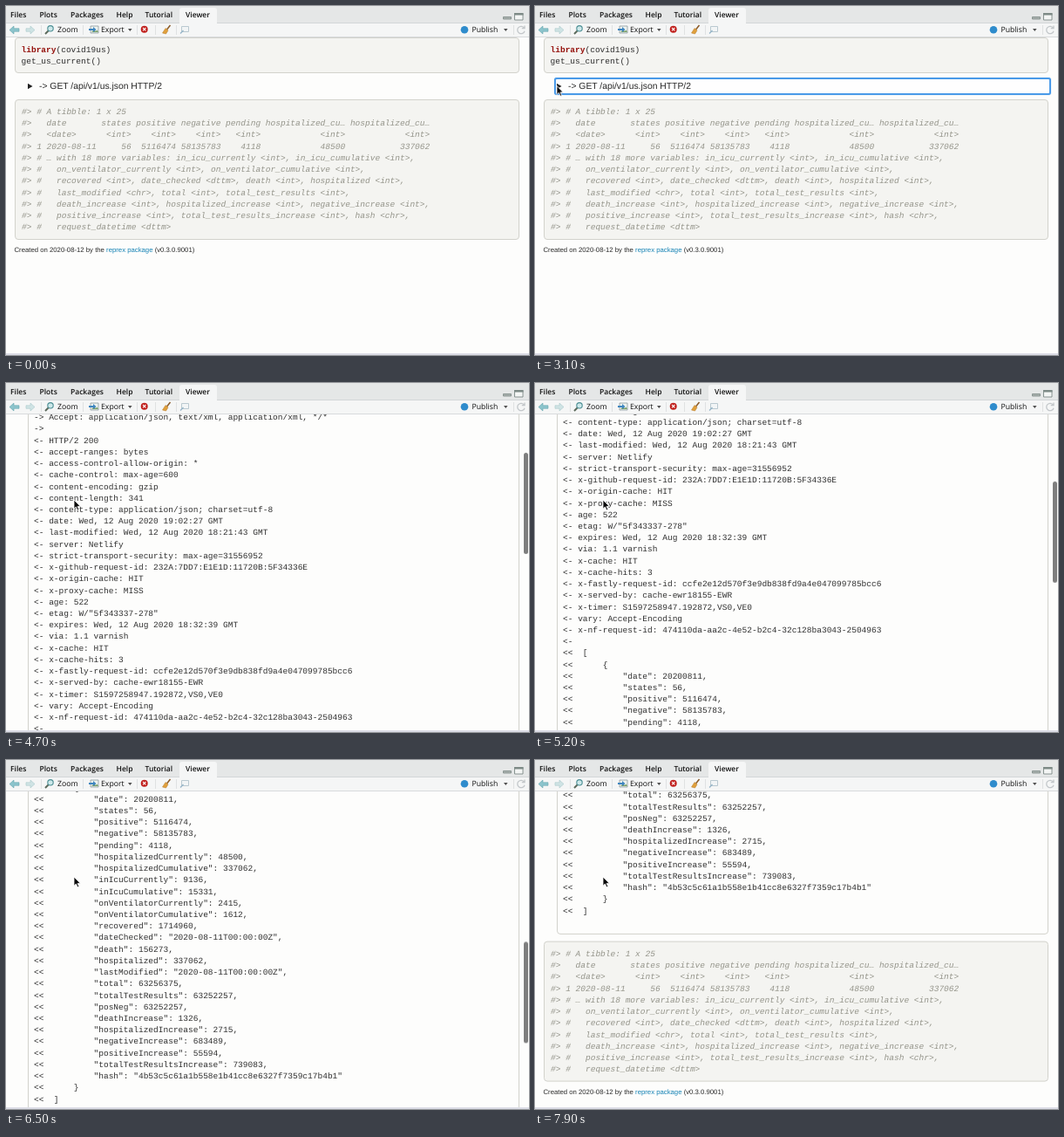
These frames come from a looping animation (600 by 400 pixels, 8000 ms). An HTML page:

```html
<!DOCTYPE html>
<html lang="en">
<head>
<meta charset="utf-8">
<title>Viewer pane</title>
<style>
@property --scroll { syntax: "<number>"; inherits: true; initial-value: 0; }
@property --shift { syntax: "<number>"; inherits: true; initial-value: 0; }

html, body { margin: 0; width: 100%; height: 100%; overflow: hidden; }
body { text-rendering: geometricPrecision; }
#stage {
  position: relative; width: 600px; height: 400px; overflow: hidden;
  background: #fdfdfc;
  animation: scroll 8s infinite, open 8s step-end infinite;
}
#stage * { position: absolute; box-sizing: border-box; }
#stage a, #stage b { position: static; }

/* window frame */
.tabs { inset: 0 0 auto; height: 20px; background: #e5e7e7; border-bottom: 1px solid #d3d6d8; }
.tab { left: 199px; top: 2px; width: 43px; height: 18px; background: #f5f6f6; border-radius: 3px 3px 0 0; }
.tools { top: 20px; width: 600px; height: 16px; background: #f5f6f6; border-bottom: 1px solid #d8dadc; }
.foot { top: 398px; width: 600px; height: 2px; background: #dcdde6; }
.chrome { left: 0; top: 0; font: 600 8.5px "Open Sans", sans-serif; fill: #101010; }
.chrome .tool { font-weight: 500; font-size: 8.7px; }

/* page */
.view { top: 36px; width: 600px; height: 362px; overflow: hidden; }
.page { top: -36px; width: 600px; height: 1200px; transform: translateY(calc(var(--scroll) * -1px)); }
.rest { top: 0; width: 600px; transform: translateY(calc(var(--shift) * 1px)); }
.box { left: 9.5px; width: 579.5px; border: 1px solid #d2d2cc; border-radius: 4px; background: #f4f4f1; }
pre { margin: 0; font: 9.52px/13.22px "Liberation Mono", monospace; color: #303030; white-space: pre; }
pre b { color: #96140f; }
.output { left: 18px; top: 115px; color: #94948a; font-style: italic; }
.note { left: 9.5px; top: 274px; font: 7.76px/12px "Liberation Sans", sans-serif; color: #2a2a2a; white-space: nowrap; }
.note a { color: #1482b4; }
.summary { left: 38px; top: 86px; font: 10.35px/14px "Liberation Sans", sans-serif; color: #262626; white-space: nowrap; }
.ring {
  left: 22px; top: 82px; width: 569.5px; height: 20px;
  border: 2.5px solid #4a9ae8; border-radius: 3px; background: #fefefe;
  box-shadow: 0 0 1px #7cb8f0; animation: ring 8s step-end infinite;
}
.arrow { left: 24.5px; top: 88.5px; width: 6px; height: 7px; background: #222; animation: turn 8s step-end infinite; }
.details { top: 0; width: 600px; animation: reveal 8s step-end infinite; }
.details .box { left: 24.5px; top: 103px; width: 564.5px; height: 834.5px; background: #fdfdfc; }
.thumb {
  left: 593.5px; top: 37.3px; width: 5px; height: 116px; border-radius: 2.5px; background: #7e7e7e;
  transform: translateY(calc(var(--scroll) * .3286px)); animation: thumb 8s infinite;
}
.cursor { left: 0; top: 0; overflow: visible; animation: cursor 8s infinite; }

@keyframes scroll {
  0%, 47.5% { --scroll: 0; animation-timing-function: steps(5); }
  53.75% { --scroll: 63; animation-timing-function: steps(4); }
  58.75% { --scroll: 130.7; animation-timing-function: steps(10); }
  71.25% { --scroll: 331; animation-timing-function: steps(8); }
  81.25% { --scroll: 521.6; animation-timing-function: steps(7); }
  90%, 100% { --scroll: 738.1; }
}
@keyframes open { 0% { --shift: 0; } 40%, 100% { --shift: 838.7; } }
@keyframes reveal { 0% { visibility: hidden; } 40%, 100% { visibility: visible; } }
@keyframes ring { 0% { visibility: hidden; } 37.5%, 100% { visibility: visible; } }
@keyframes turn {
  0% { clip-path: polygon(0 0, 100% 50%, 0 100%); }
  40%, 100% { clip-path: polygon(0 10%, 100% 10%, 50% 95%); }
}
@keyframes thumb {
  0%, 47.4% { opacity: 0; }
  48.75%, 92% { opacity: 1; }
  95%, 100% { opacity: 0; }
}
@keyframes cursor {
  0%, 28.74% { transform: translate(60px, 180px); visibility: hidden; }
  28.75% { transform: translate(60px, 180px); visibility: visible; animation-timing-function: steps(5); }
  35%, 42.5% { transform: translate(25px, 91.5px); visibility: visible; animation-timing-function: steps(4); }
  47.5%, 100% { transform: translate(78px, 134px); visibility: visible; }
}
</style>
</head>
<body>
<div id="stage">
  <div class="view">
    <div class="page">
      <div class="box" style="top:35.5px;height:41.5px"></div>
      <pre style="left:17.5px;top:44.2px"><b>library</b>(covid19us)
get_us_current()</pre>
      <div class="ring"></div>
      <div class="arrow"></div>
      <div class="summary">-&gt; GET /api/v1/us.json HTTP/2</div>
      <div class="details">
        <div class="box"></div>
        <pre id="log" style="left:32px;top:111.4px"></pre>
      </div>
      <div class="rest">
        <div class="box" style="top:107px;height:160.5px"></div>
        <pre class="output" id="output"></pre>
        <div class="note">Created on 2020-08-12 by the <a>reprex package</a> (v0.3.0.9001)</div>
      </div>
    </div>
  </div>
  <div class="thumb"></div>

  <div class="tabs"></div>
  <div class="tab"></div>
  <div class="tools"></div>
  <div class="foot"></div>
  <svg class="chrome" width="600" height="40">
    <g>
      <text x="5" y="13.4">Files</text>
      <text x="38.5" y="13.4">Plots</text>
      <text x="74" y="13.4">Packages</text>
      <text x="126.5" y="13.4">Help</text>
      <text x="159.5" y="13.4">Tutorial</text>
      <text x="206" y="13.4">Viewer</text>
    </g>
    <g class="tool">
      <text x="59" y="30.4">Zoom</text>
      <text x="109" y="30.4">Export</text>
      <text x="534.5" y="30.4">Publish</text>
    </g>
    <path d="M140 26h4.6l-2.3 3zM571 26h4.6l-2.3 3z" fill="#505050"/>
    <path d="M40.5 22v11M88.5 22v11M150.5 22v11M171.5 22v11M195.5 22v11M582.5 22v11" stroke="#dfe1e2"/>
    <!-- history arrows -->
    <path d="M4 27.5l5-4.500v2.800h6v3.400h-6v2.800z" fill="#8cc4cc" stroke="#64a5ae" stroke-width=".6"/>
    <path d="M33 27.5l-5-4.500v2.800h-5v3.400h5v2.800z" fill="#cfe3e4" stroke="#a9c9cc" stroke-width=".6"/>
    <!-- magnifier -->
    <path d="M45 32l4-4" stroke="#5b6a5c" stroke-width="2"/>
    <circle cx="51" cy="25.8" r="3.2" fill="#cde8ea" stroke="#4d8f94" stroke-width="1.1"/>
    <!-- export -->
    <path d="M97 23h9v8h-9z" fill="#eef3f0" stroke="#8b9aa0" stroke-width=".8"/>
    <path d="M98 30l3-3 2 2 1.5-1.5 1.5 2.5z" fill="#7ba06a"/>
    <path d="M95 26h5v-2l3.5 3-3.5 3v-2h-5z" fill="#3f86c0"/>
    <!-- remove -->
    <circle cx="158.7" cy="26.7" r="4" fill="#c01f1c"/>
    <path d="M157 25l3.4 3.4m0-3.4l-3.4 3.4" stroke="#fff" stroke-width="1.1"/>
    <!-- broom -->
    <path d="M188.5 22l-4 5" stroke="#8a5a28" stroke-width="1.5"/>
    <path d="M183 25.5l3 2.5-2.5 4-4-1z" fill="#e0a03c" stroke="#b67a28" stroke-width=".5"/>
    <!-- new window -->
    <path d="M201.5 23.5h8v6h-8z" fill="#f2f5f6" stroke="#b4c4cc" stroke-width=".9"/>
    <path d="M200 31.5l3.5-3.5" stroke="#94b4c8" stroke-width="1.3"/>
    <circle cx="526" cy="27.3" r="4.3" fill="#2f8ccc"/>
    <!-- refresh -->
    <path d="M594.5 25.2a4.2 4.2 0 1 0 .5 3.5M595 22.5v3.2h-3.2" fill="none" stroke="#c3c7ca" stroke-width="1.3"/>
    <!-- pane buttons -->
    <path d="M570.5 12.5h9v2.5h-9z" fill="#a9b1ae" stroke="#7d8a86" stroke-width=".8"/>
    <path d="M583.5 8.5h9.5v7.5h-9.5z" fill="#f4f6f5" stroke="#7d8a86" stroke-width=".9"/>
    <path d="M583 8h10.5v2.5h-10.5z" fill="#7d8a86"/>
  </svg>
  <svg class="cursor" width="10" height="14">
    <path d="M0 0v10.2l2.4-2.2 1.7 3.7 1.7-.8-1.7-3.5h3.2z" fill="#0a0a0a" stroke="#fff" stroke-width=".8"/>
  </svg>
</div>
<script>
const prefix = (mark, text) => text.trim().split("\n").map(line => mark + line.trim());
const show = (id, lines) => document.getElementById(id).textContent = lines.join("\n");

const request = prefix("-> ", `GET /api/v1/us.json HTTP/2
  Host: covidtracking.com
  User-Agent: libcurl/7.64.1 r-curl/4.3 httr/1.4.2
  Accept-Encoding: deflate, gzip
  Accept: application/json, text/xml, application/xml, */*`);

const response = prefix("<- ", `HTTP/2 200
  accept-ranges: bytes
  access-control-allow-origin: *
  cache-control: max-age=600
  content-encoding: gzip
  content-length: 341
  content-type: application/json; charset=utf-8
  date: Wed, 12 Aug 2020 19:02:27 GMT
  last-modified: Wed, 12 Aug 2020 18:21:43 GMT
  server: Netlify
  strict-transport-security: max-age=31556952
  x-github-request-id: 232A:7DD7:E1E1D:11720B:5F34336E
  x-origin-cache: HIT
  x-proxy-cache: MISS
  age: 522
  etag: W/"5f343337-278"
  expires: Wed, 12 Aug 2020 18:32:39 GMT
  via: 1.1 varnish
  x-cache: HIT
  x-cache-hits: 3
  x-fastly-request-id: ccfe2e12d570f3e9db838fd9a4e047099785bcc6
  x-served-by: cache-ewr18155-EWR
  x-timer: S1597258947.192872,VS0,VE0
  vary: Accept-Encoding
  x-nf-request-id: 474110da-aa2c-4e52-b2c4-32c128ba3043-2504963`);

const record = {
  date: 20200811, states: 56, positive: 5116474, negative: 58135783, pending: 4118,
  hospitalizedCurrently: 48500, hospitalizedCumulative: 337062,
  inIcuCurrently: 9136, inIcuCumulative: 15331,
  onVentilatorCurrently: 2415, onVentilatorCumulative: 1612,
  recovered: 1714960, dateChecked: "2020-08-11T00:00:00Z", death: 156273,
  hospitalized: 337062, lastModified: "2020-08-11T00:00:00Z", total: 63256375,
  totalTestResults: 63252257, posNeg: 63252257, deathIncrease: 1326,
  hospitalizedIncrease: 2715, negativeIncrease: 683489, positiveIncrease: 55594,
  totalTestResultsIncrease: 739083, hash: "4b53c5c61a1b558e1b41cc8e6327f7359c17b4b1"
};
const fields = Object.entries(record).map(([key, value]) => `"${key}": ${JSON.stringify(value)}`);
const body = ["  [", "      {", ...fields.join(",\n").split("\n").map(f => " ".repeat(10) + f), "      }", "  ]"];
show("log", [...request, "->", ...response, "<-", ...body.map(line => "<<" + line)]);

const widths = [7, 9, 9, 8, 17, 17];
const row = (head, cells) => head.padEnd(15) + cells.map((c, i) => c.padStart(widths[i])).join("");
const cut = "hospitalized_cu…";
const variables = prefix("#> #   ", `on_ventilator_currently <int>, on_ventilator_cumulative <int>,
  recovered <int>, date_checked <dttm>, death <int>, hospitalized <int>,
  last_modified <chr>, total <int>, total_test_results <int>,
  death_increase <int>, hospitalized_increase <int>, negative_increase <int>,
  positive_increase <int>, total_test_results_increase <int>, hash <chr>,
  request_datetime <dttm>`);
show("output", [
  "#> # A tibble: 1 x 25",
  row("#>   date", ["states", "positive", "negative", "pending", cut, cut]),
  row("#>   <date>", Array(6).fill("<int>")),
  row("#> 1 2020-08-11", ["56", "5116474", "58135783", "4118", "48500", "337062"]),
  "#> # … with 18 more variables: in_icu_currently <int>, in_icu_cumulative <int>,",
  ...variables
]);
</script>
</body>
</html>
```
